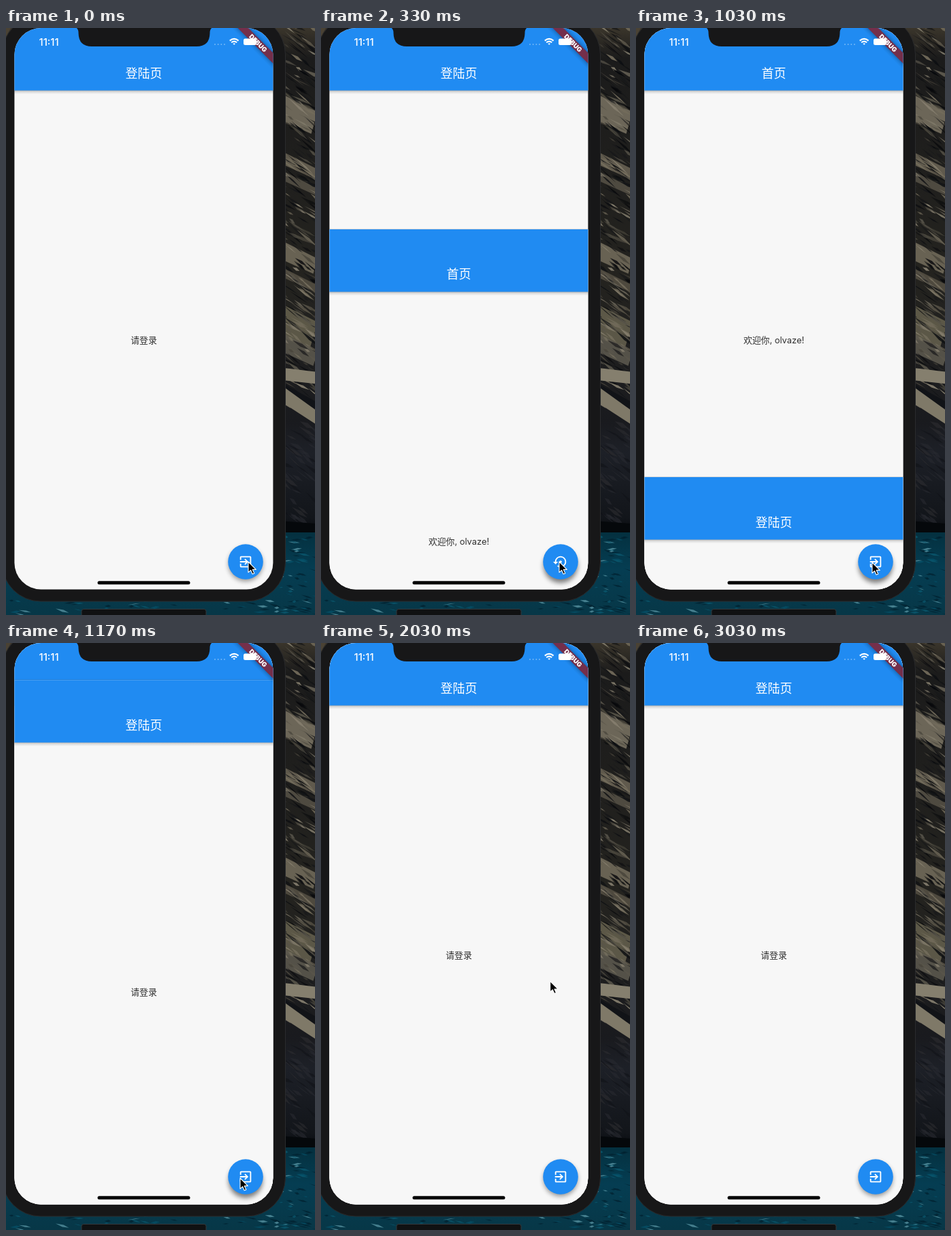
Write an HTML page that moves like this. It is 454 px wide and 860 px high and loops after 3060 ms.

```html
<!DOCTYPE html>
<html lang="zh">
<head>
<meta charset="utf-8">
<style>
  html, body { margin: 0; width: 100%; height: 100%; overflow: hidden; background: #15171a; }
  svg { display: block; width: 100%; height: 100%; }
  text { font-family: Inter, "Noto Sans CJK SC", "Noto Sans CJK", sans-serif; }
  .title { font-size: 18px; font-weight: 500; fill: #fff; text-anchor: middle; }
  .body { font-size: 12.85px; fill: #303030; text-anchor: middle; }
  .time { font-size: 14.8px; font-weight: 500; fill: #fff; }
  .debug { font-size: 9.4px; font-weight: 900; fill: #fff; text-anchor: middle; }
</style>
</head>
<body>
<svg viewBox="0 0 454 860" xmlns="http://www.w3.org/2000/svg">
  <defs>
    <clipPath id="screen"><rect x="12.4" y="0" width="380" height="822.5" rx="39"/></clipPath>
    <linearGradient id="barShadow" x2="0" y2="1">
      <stop offset="0" stop-opacity=".34"/>
      <stop offset=".35" stop-opacity=".13"/>
      <stop offset="1" stop-opacity="0"/>
    </linearGradient>
    <linearGradient id="rock" x2="0" y2="1">
      <stop offset="0" stop-color="#3a352b"/>
      <stop offset=".06" stop-color="#1b1b1b"/>
      <stop offset=".5" stop-color="#24231f"/>
      <stop offset=".78" stop-color="#191a1e"/>
      <stop offset=".84" stop-color="#1d2027"/>
      <stop offset=".97" stop-color="#12151a"/>
      <stop offset="1" stop-color="#06090d"/>
    </linearGradient>
    <linearGradient id="water" x2="0" y2="1">
      <stop offset="0" stop-color="#04303f"/>
      <stop offset=".45" stop-color="#053d52"/>
      <stop offset="1" stop-color="#073747"/>
    </linearGradient>
    <filter id="soft" x="-50%" y="-50%" width="200%" height="200%"><feGaussianBlur stdDeviation="3.5"/></filter>
    <filter id="blur" x="-10%" y="-10%" width="120%" height="120%"><feGaussianBlur stdDeviation=".7"/></filter>
  </defs>

  <rect width="454" height="740" fill="url(#rock)"/>
  <rect y="738" width="454" height="122" fill="url(#water)"/>
  <g id="texture" filter="url(#blur)"></g>

  <rect x="-6" y="-18" width="416.5" height="858" rx="57" fill="#171718" stroke="#2a2b2d"/>
  <rect x="111" y="851.5" width="183" height="20" rx="3" fill="#101112" stroke="#34383b"/>

  <g clip-path="url(#screen)">
    <g id="base"></g>
    <g id="home"></g>
    <g id="login"></g>

    <circle id="shade" cx="352" cy="786" r="25" filter="url(#soft)"/>
    <circle cx="352" cy="782" r="25.8" fill="#208bf2"/>
    <g transform="translate(341 771) scale(.918)" fill="#fff">
      <path id="exitIcon" d="M10.09 15.59L11.5 17l5-5-5-5-1.41 1.41L12.67 11H3v2h9.67l-2.58 2.59zM19 3H5c-1.11 0-2 .9-2 2v4h2V5h14v14H5v-4H3v4c0 1.1.89 2 2 2h14c1.1 0 2-.9 2-2V5c0-1.1-.9-2-2-2z"/>
      <path id="resetIcon" d="M14 12c0-1.1-.9-2-2-2s-2 .9-2 2 .9 2 2 2 2-.9 2-2zm-2-9c-4.97 0-9 4.03-9 9H0l4 4 4-4H5c0-3.87 3.13-7 7-7s7 3.13 7 7-3.13 7-7 7c-1.51 0-2.91-.49-4.06-1.3l-1.42 1.44C8.04 20.3 9.94 21 12 21c4.97 0 9-4.03 9-9s-4.03-9-9-9z"/>
    </g>

    <g transform="translate(392.4 0) rotate(45)">
      <rect x="-45" y="25.7" width="90" height="11" filter="url(#soft)" opacity=".45"/>
      <rect x="-45" y="25.7" width="90" height="11" fill="#742f4b"/>
    </g>
    <rect x="349" y="15.5" width="19" height="9.5" rx="2.5" fill="#fff"/>
    <text class="debug" transform="translate(392.4 0) rotate(45)" y="34.6">DEBUG</text>
    <g fill="#fff" opacity=".38">
      <circle cx="307" cy="24" r="1"/><circle cx="311.7" cy="24" r="1"/>
      <circle cx="316.4" cy="24" r="1"/><circle cx="321" cy="24" r="1"/>
    </g>
    <g fill="none" stroke="#fff" stroke-width="2.1">
      <path d="M328.8 18.6q6.4-5.4 12.8 0M331.2 21.3q4-3.3 8 0"/>
      <path d="M333.4 22.9q1.8-1.2 3.6 0l-1.8 1.9z" fill="#fff" stroke="none"/>
    </g>
    <text class="time" x="48.5" y="25.5">11:11</text>
    <rect x="134.5" y="810.3" width="136" height="5" rx="2.5" fill="#050505"/>
  </g>
  <path d="M100-2Q106.500 0 106.500 7V8Q107 27 126 27H280Q299 27 299.500 8V7Q299.500 0 306-2z" fill="#171718"/>
  <path id="cursor" d="M0 0V15.600l3.600-3.300 2.500 5.700 2.700-1.100-2.500-5.500H11.300z" fill="#000" stroke="#fff" stroke-width="1.100" stroke-linejoin="round"/>
</svg>

<script>
const LOOP = 3060, HEIGHT = 822.5, SLIDE = 265;
const HOME_START = 232.3, LOGIN_START = 989.4;
const $ = id => document.getElementById(id);

const page = (title, body) => `
  <rect x="12" width="381" height="823" fill="#f7f7f7"/>
  <rect x="12" y="91" width="381" height="6" fill="url(#barShadow)"/>
  <rect x="12" y="-1" width="381" height="1" opacity=".12"/>
  <rect x="12" width="381" height="91.5" fill="#208bf2"/>
  <text class="title" x="202.500" y="72.500">${title}</text>
  <text class="body" x="202.500" y="462">${body}</text>`;

$('base').innerHTML = $('login').innerHTML = page('登陆页', '请登录');
$('home').innerHTML = page('首页', '欢迎你, olvaze!');

function random(seed) {
  return () => (seed = seed * 16807 % 2147483647) / 2147483647;
}

// Slanted rock ledges with cracks, and wave crests behind the phone.
function drawTexture() {
  const rnd = random(4217);
  const pick = list => list[Math.floor(rnd() * list.length)];
  const slab = (x, y, w, h, slope, fill, opacity = 1) =>
    `<path d="M${x} ${y}l${w} ${w * slope}l${-h * .3} ${h}l${-w} ${-w * slope * .9}z" fill="${fill}" opacity="${opacity}"/>`;
  const sliver = (x, y, w, h, slope, fill, opacity) =>
    `<path d="M${x} ${y}l${w * .6} ${w * slope * .6 - h * .5}l${w * .4} ${w * slope * .4 + h * .5}l${-w * .5} ${h * .5 - w * slope * .5}z" fill="${fill}" opacity="${opacity}"/>`;
  const tans = ['#77705f', '#8b8473', '#5a564b', '#4a463c'];
  const darks = ['#0d0f12', '#17181a', '#08090c'];
  const bands = [[96, 32, '#7b7463'], [180, 14, '#6d6656'], [208, 10, '#585347'],
    [311, 22, '#756e5d'], [350, 10, '#565145'], [404, 40, '#67624f'], [446, 22, '#5f5b50']];
  let out = '';
  for (const [y, h, fill] of bands) out += slab(404, y, 54, h, .5, fill, .85);
  for (let i = 0; i < 300; i++) {
    const y = rnd() * 575 - 25, dark = rnd() < (y > 20 && y < 90 ? .75 : .52);
    out += sliver(398 + rnd() * 50, y, 8 + rnd() * 24, 1 + rnd() * 5, .45 + rnd() * .5,
      pick(dark ? darks : tans), .55 + rnd() * .35);
  }
  out += slab(400, 497, 60, 17, .12, '#857f6e') + slab(402, 518, 58, 9, .55, '#111317');
  out += slab(404, 523, 56, 17, .72, '#7f7968');
  for (let i = 0; i < 40; i++)
    out += sliver(400 + rnd() * 45, 570 + rnd() * 145, 10 + rnd() * 20, 2 + rnd() * 6, .4 + rnd() * .6,
      pick(['#282a30', '#101318', '#2d2d30']), .6);
  out += '<path d="M400 722L454 726V739H400z" fill="#05080b"/>';
  out += '<path d="M0 0H7L0 13z" fill="#4a4234"/>';
  for (let i = 0; i < 90; i++) {
    const side = i < 45, x = side ? 400 + rnd() * 50 : rnd() * 454;
    const y = side ? 742 + rnd() * 116 : 838 + rnd() * 20;
    out += sliver(x, y, 6 + rnd() * 14, 1 + rnd() * 3, rnd() * .5 - .15,
      pick(['#02202d', '#06536b', '#02202d', '#0b5c73', '#5f9dab']), .7);
  }
  $('texture').innerHTML = out;
}

// cubic-bezier(.25, .1, .25, 1)
function ease(p) {
  if (p <= 0) return 0;
  if (p >= 1) return 1;
  const curve = (s, a, b) => 3 * (1 - s) ** 2 * s * a + 3 * (1 - s) * s * s * b + s ** 3;
  let low = 0, high = 1;
  for (let i = 0; i < 24; i++) {
    const mid = (low + high) / 2;
    if (curve(mid, .25, .25) < p) low = mid; else high = mid;
  }
  return curve(low, .1, 1);
}

const pointer = [[0, 356, 782], [330, 350, 782], [1030, 347, 783], [1170, 344, 784], [1600, 343, 783],
  [1670, 332, 742], [2130, 338, 428], [2370, 304, 75], [2430, 290, -25], [LOOP, 290, -25]];

function pointerAt(t) {
  const i = pointer.findIndex(k => k[0] > t);
  const [t0, x0, y0] = pointer[i - 1], [t1, x1, y1] = pointer[i];
  const p = (t - t0) / (t1 - t0);
  return [x0 + (x1 - x0) * p, y0 + (y1 - y0) * p];
}

function slide(id, start, t) {
  const y = HEIGHT * (1 - ease((t - start) / SLIDE));
  $(id).setAttribute('transform', `translate(0 ${y})`);
  $(id).setAttribute('visibility', t < start ? 'hidden' : 'visible');
}

function render(t) {
  slide('home', HOME_START, t);
  slide('login', LOGIN_START, t);
  const onHome = t >= HOME_START && t < LOGIN_START;
  $('exitIcon').setAttribute('visibility', onHome ? 'hidden' : 'visible');
  $('resetIcon').setAttribute('visibility', onHome ? 'visible' : 'hidden');
  const pressed = (t > 120 && t < 480) || (t > 880 && t < 1250);
  $('shade').setAttribute('cy', pressed ? 788 : 785.5);
  $('shade').setAttribute('opacity', pressed ? .5 : .42);
  $('cursor').setAttribute('transform', `translate(${pointerAt(t)})`);
}

drawTexture();
const begin = performance.now();
function tick() {
  render((performance.now() - begin) % LOOP);
  requestAnimationFrame(tick);
}
tick();
</script>
</body>
</html>
```
